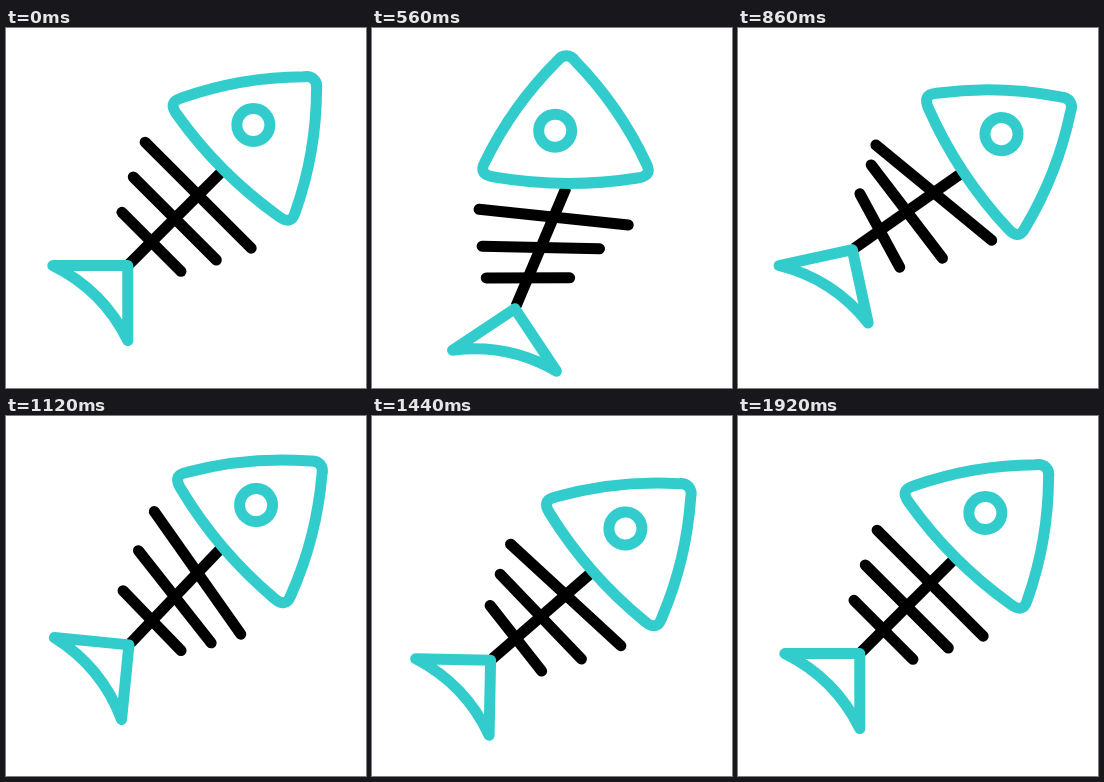
Animation of 360x360 px, one loop 2.4 s. Source, as an HTML page:

```html
<!DOCTYPE html>
<html>
<head>
<meta charset="utf-8">
<style>
  html, body { margin: 0; height: 100%; overflow: hidden; background: #fff; }
  svg { display: block; width: 100%; height: 100%; }
  g { fill: none; stroke-width: 11; stroke-linejoin: round; }
  .bone { stroke: #000; stroke-linecap: round; }
  .skin { stroke: #3cc; }
</style>
</head>
<body>
<svg viewBox="0 0 360 360">
  <g id="body">
    <g class="bone">
      <path d="M0 64V-65" stroke-linecap="butt"/>
      <path id="rib1" d="M-75 0H75"/>
      <path id="rib2" d="M-58.7 0H58.7"/>
      <path id="rib3" d="M-41.7 0H41.7"/>
    </g>
    <g class="skin">
      <path id="tail" d="M0 0L-53 53Q0 35 53 53Z"/>
      <g id="head">
        <path d="M-72 -12Q0 0 72 -12C81 -13.5 86 -17 80.5 -27Q53.5 -83.5 9 -128.5C4 -135.5 -4 -135.5 -9 -128.5Q-53.5 -83.5 -80.5 -27C-86 -17 -81 -13.5 -72 -12Z"/>
        <circle cx="-10.6" cy="-58.7" r="16.5"/>
      </g>
    </g>
  </g>
</svg>
<script>
const LOOP = 2400;

// Keys are [time, value]; both curves are damped swings that end at rest.
const SWING = [[0, 0], [520, -23], [910, 11.25], [1240, -6.5], [1440, 4], [1600, 0]];
const BOB = [[0, 0], [560, 29], [1000, -17.5], [1360, 13], [1620, 0]];

// Each part repeats the body's swing after its own delay: [id, y on spine, delay]
const PARTS = [
  ["rib3", 33, 45],
  ["head", -63, 90],
  ["rib2", 0, 120],
  ["rib1", -33, 220],
  ["tail", 66.5, 300],
];

function ease(keys, t) {
  if (t <= 0) return 0;
  const i = keys.findIndex(key => key[0] > t);
  if (i < 0) return 0;
  const [t0, v0] = keys[i - 1], [t1, v1] = keys[i];
  return v0 + (v1 - v0) * (1 - Math.cos(Math.PI * (t - t0) / (t1 - t0))) / 2;
}

function place(id, x, y, angle) {
  document.getElementById(id).setAttribute("transform", `translate(${x} ${y}) rotate(${angle})`);
}

function draw() {
  const t = performance.now() % LOOP;
  place("body", 168.8, 190.5 + ease(BOB, t), 45 + ease(SWING, t));
  for (const [id, y, delay] of PARTS) place(id, 0, y, ease(SWING, t - delay));
  requestAnimationFrame(draw);
}
draw();
</script>
</body>
</html>
```
